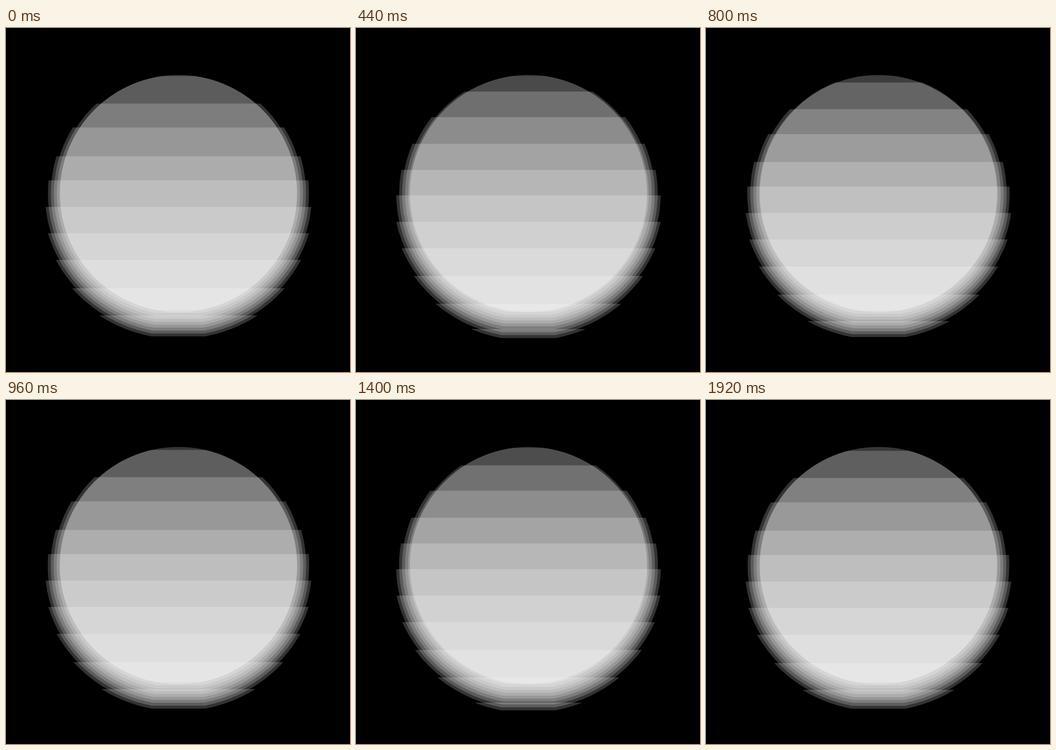
Recreate the animation shown at these times as an HTML page. Size 748 by 748 pixels, loop 1.96 s.

```html
<!DOCTYPE html>
<html lang="en">
<head>
<meta charset="utf-8">
<title>Rising layers</title>
<style>
  html, body { margin: 0; width: 100%; height: 100%; overflow: hidden; background: #000; }
  svg { display: block; width: 100vw; height: 100vh; }
</style>
</head>
<body>
<svg viewBox="0 0 748 748">
  <circle cx="375" cy="360" r="258" fill="#fff" fill-opacity=".2"/>
  <g id="layers" fill="#fff"></g>
</svg>
<script>
const LOOP = 1960, HOLD = 40, RATE = 30;
const CX = 375, CY = 360, RADIUS = 258, ALPHA = 0.2;
const BOTTOM = 0.9828;
// Height of a layer's upper edge after each second of its life.
const TOPS = [677, 625, 566, 504.3, 446.2, 389, 331.2, 279, 216.2, 164.3, 104.4];
const LIFE = TOPS.length - 1;

const group = document.getElementById('layers');
const layers = TOPS.map(() =>
  group.appendChild(document.createElementNS('http://www.w3.org/2000/svg', 'path')));

function topAt(age) {
  const i = Math.min(Math.floor(age), LIFE - 1);
  return TOPS[i] + (TOPS[i + 1] - TOPS[i]) * (age - i);
}

// Disc cut by two horizontal chords.
function slice(r, top, bottom) {
  if (top >= bottom) return '';
  const half = y => Math.sqrt(Math.max(0, r * r - (y - CY) ** 2));
  const a = half(top), b = half(bottom);
  return `M${CX - a} ${top}H${CX + a}A${r} ${r} 0 0 1 ${CX + b} ${bottom}` +
         `H${CX - b}A${r} ${r} 0 0 1 ${CX - a} ${top}Z`;
}

function render(ms) {
  const time = Math.floor((ms % LOOP) / HOLD) * HOLD;
  const frame = Math.max(0, Math.floor(time * RATE / 1000 - 0.001));
  const phase = (frame % RATE) / RATE;
  layers.forEach((layer, i) => {
    const age = Math.min(i + phase, LIFE);
    const r = RADIUS * (1.25 - 0.25 * age / LIFE);
    layer.setAttribute('d', slice(r, topAt(age), CY + r * BOTTOM));
    layer.setAttribute('fill-opacity', i === LIFE ? ALPHA * (1 - phase) : ALPHA);
  });
}

const start = performance.now();
function tick() {
  render(performance.now() - start);
  requestAnimationFrame(tick);
}
tick();
</script>
</body>
</html>
```
